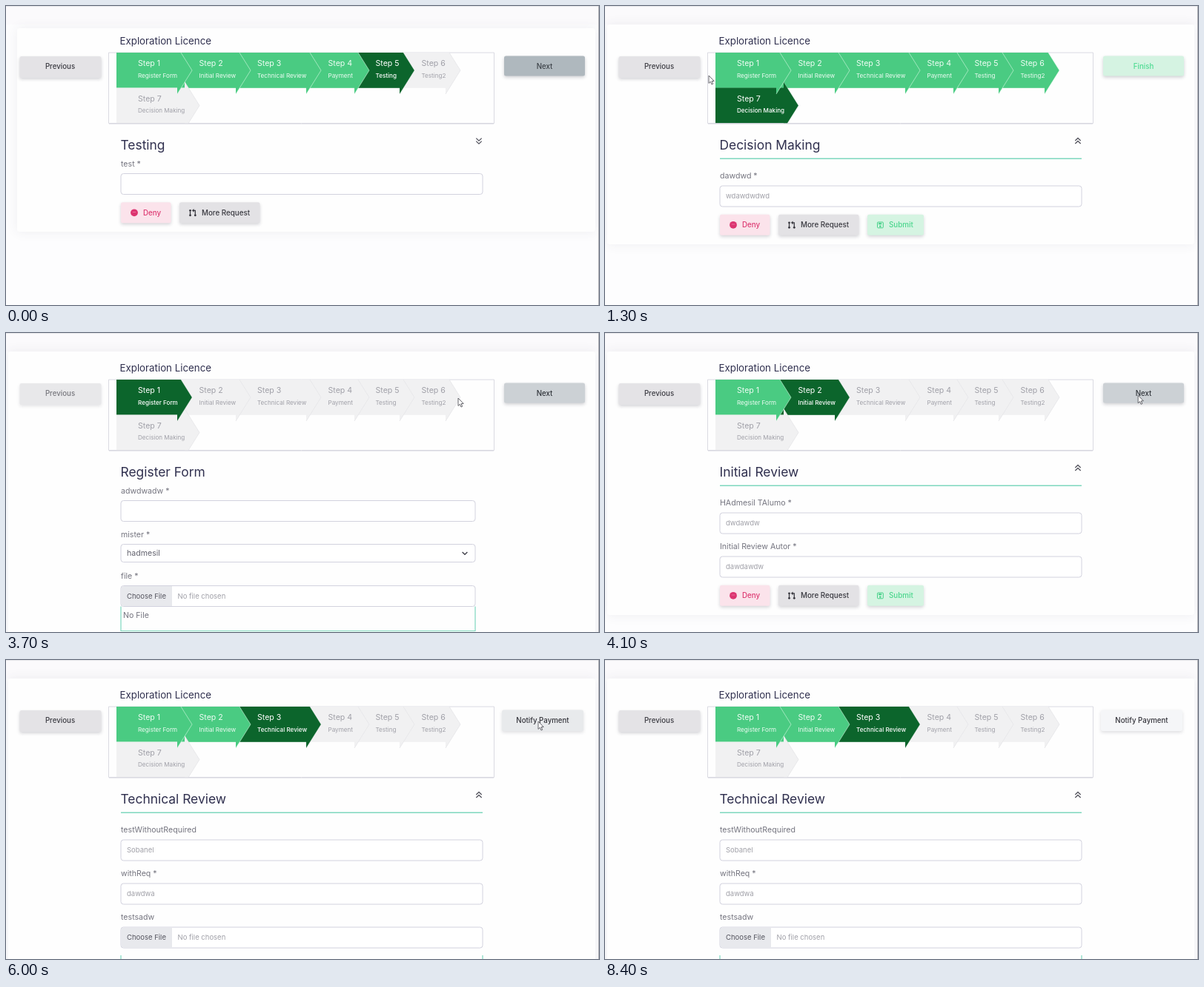
These frames come from a looping animation (800x404 px, 8.5 s). An HTML page with a canvas:

```html
<!DOCTYPE html>
<html lang="en">
<head>
<meta charset="utf-8">
<title>Licence workflow</title>
<style>
  html, body { margin: 0; width: 100%; height: 100%; overflow: hidden; background: #fdfdfe; }
  canvas { display: block; width: 800px; height: 404px; }
</style>
</head>
<body>
<canvas id="stage"></canvas>
<script>
const W = 800, H = 404, LOOP = 8500, TICK = 100;
const canvas = document.getElementById('stage');
const ctx = canvas.getContext('2d');
const ratio = window.devicePixelRatio || 1;
canvas.width = W * ratio;
canvas.height = H * ratio;

const INK = '#30304f', LABEL = '#74747f', MUTED = '#a0a0a8';
const DONE = '#4acb82', CURRENT = '#0c652c', IDLE = '#f1f1f2', TEAL = '#7ed8be';

// name, text x, arrow tip x
const STEPS = [
  ['Register Form', 178, 251],
  ['Initial Review', 260.5, 330],
  ['Technical Review', 339, 425],
  ['Payment', 434.5, 490],
  ['Testing', 498.5, 551],
  ['Testing2', 560.5, 613],
  ['Decision Making', 178, 261]
];

const FORMS = {
  testing: { bottom: 305, width: 488, toggle: 'down', fields: [['test *', '']], buttons: 2 },
  decision: { bottom: 322, width: 488, toggle: 'up', fields: [['dawdwd *', 'wdawdwdwd']], buttons: 3 },
  loading: { bottom: 249, width: 488, fields: [], buttons: 0 },
  register: {
    bottom: 430, width: 478, buttons: 0, previewGap: 0,
    fields: [['adwdwadw *', ''], ['mister *', 'hadmesil', 'select'], ['file *', '', 'file']]
  },
  initial: {
    bottom: 381, width: 488, toggle: 'up', buttons: 3,
    fields: [['HAdmesil TAlumo *', 'dwdawdw'], ['Initial Review Autor *', 'dawdawdw']]
  },
  technical: {
    bottom: 430, width: 488, toggle: 'up', buttons: 0, previewGap: 10,
    fields: [['testWithoutRequired', 'Sobanel'], ['withReq *', 'dawdwa'], ['testsadw', '', 'file']]
  }
};

// Each entry: start time, value
const STEP_TIMES = [[0, 5], [300, 6], [700, 7], [1700, 1], [4000, 2], [4300, 3]];
const FORM_TIMES = [[0, 'testing'], [300, 'decision'], [1700, 'loading'], [2500, 'register'],
  [4000, 'initial'], [4900, 'technical']];
const ACTIONS = {
  pressed: ['Next', 672, '#afb8be', '#3c4248'],
  next: ['Next', 672, '#ccd1d5', '#30343a'],
  finish: ['Finish', 672, '#d5f3e2', '#4ddb92'],
  notify: ['Notify Payment', 669, '#f5f6f8', '#33333a'],
  hover: ['Notify Payment', 669, '#e8eaec', '#33333a']
};
const ACTION_TIMES = [[0, 'pressed'], [300, 'next'], [700, 'finish'], [1700, 'next'],
  [4300, 'notify'], [4900, 'hover'], [6300, 'notify']];
const POINTER = [[200, 728, 84], [900, 150, 92], [1300, 140, 94], [1600, 192, 84], [2700, 193, 84],
  [3400, 514, 86], [3500, 514, 86], [3700, 610, 88], [3900, 722, 84], [4600, 712, 85],
  [5300, 718, 83], [6200, 718, 83], [6800, 600, 410]];

const at = (track, t) => track.filter(k => k[0] <= t).pop()[1];

function text(str, x, y, size, color, weight = 400, align = 'left') {
  ctx.font = `${weight} ${size}px Inter, "Open Sans", sans-serif`;
  ctx.fillStyle = color;
  ctx.textAlign = align;
  ctx.fillText(str, x, y);
}

function path(points, close) {
  ctx.beginPath();
  points.forEach(([x, y], i) => i ? ctx.lineTo(x, y) : ctx.moveTo(x, y));
  if (close) ctx.closePath();
}

function line(points, color, width = 1) {
  path(points);
  ctx.strokeStyle = color;
  ctx.lineWidth = width;
  ctx.stroke();
}

function box(x, y, w, h, r, fill, stroke) {
  ctx.beginPath();
  ctx.roundRect(x, y, w, h, r);
  if (fill) { ctx.fillStyle = fill; ctx.fill(); }
  if (stroke) { ctx.strokeStyle = stroke; ctx.lineWidth = 1; ctx.stroke(); }
}

function raised(x, y, w, h, fill, shade = 0.2) {
  ctx.save();
  ctx.shadowColor = `rgba(40,40,60,${shade})`;
  ctx.shadowBlur = 4 * ratio;
  ctx.shadowOffsetY = 2 * ratio;
  box(x, y, w, h, 2.5, fill);
  ctx.restore();
}

function drawPage(bottom, first) {
  ctx.fillStyle = '#fdfdfe';
  ctx.fillRect(0, 0, W, H);
  ctx.fillStyle = '#fbfafc';
  ctx.fillRect(0, 0, W, 25);
  ctx.save();
  ctx.shadowColor = 'rgba(60,60,90,0.08)';
  ctx.shadowBlur = 16 * ratio;
  const x = first ? 15 : 3, y = first ? 30 : 25;
  box(x, y, 795 - x, bottom - y, 3, '#fefefe');
  ctx.restore();
  ctx.fillStyle = '#e6e6e9';
  ctx.fillRect(0, 0, W, 1);
  ctx.fillStyle = '#aeaeb4';
  ctx.fillRect(799, 0, 1, H);
}

function drawSteps(active) {
  box(138.5, 63, 520, 95.5, 0, '#fefefe', '#dadae2');
  line([[139, 159.2], [658, 159.2]], '#cfcfd8', 0.7);
  const fill = i => i + 1 < active ? DONE : i + 1 === active ? CURRENT : IDLE;

  ctx.save();
  ctx.beginPath();
  ctx.rect(139, 63, 519, 95.3);
  ctx.clip();
  STEPS.forEach(([, , tip], i) => {
    const left = i % 6 ? STEPS[i - 1][2] - 20 : 149;
    ctx.fillStyle = fill(i);
    ctx.fillRect(left, i < 6 ? 63 : 110.5, tip - 20 - left + 0.3, 47.8);
  });
  for (let i = 6; i >= 0; i--) {
    const tip = STEPS[i][2], mid = i < 6 ? 87 : 134.5;
    const edge = [[tip - 20, mid - 32], [tip, mid], [tip - 20, mid + 32]];
    path(edge, true);
    ctx.fillStyle = fill(i);
    ctx.fill();
    line(edge, i + 1 < active ? 'rgba(235,255,242,0.65)' : i + 1 > active ? '#e5e5e7' : 'rgba(255,255,255,0.3)', 0.8);
  }
  ctx.restore();

  STEPS.forEach(([name, x], i) => {
    const y = i < 6 ? 81 : 128.7;
    const color = i + 1 < active ? '#effcf4' : i + 1 === active ? '#ffffff' : MUTED;
    text('Step ' + (i + 1), x, y, 10.6, color);
    text(name, x, y + 15.6, 8.1, color, i + 1 === active ? 500 : 400);
  });
}

function drawToggle(dir) {
  const s = dir === 'up' ? -1 : 1;
  for (const y of [-2, 2]) {
    line([[634.3, 182.3 + y - 1.7 * s], [638, 182.3 + y + 1.8 * s], [641.7, 182.3 + y - 1.7 * s]], '#55555f', 1.3);
  }
}

function drawField([label, value, kind], y, width) {
  const top = y + 13.5, h = kind === 'select' ? 24 : 28, mid = top + h / 2;
  text(label, 155, y + 3.7, 10.6, LABEL);
  box(155, top, width, h, 3.5, '#ffffff', '#d2d2de');
  if (kind === 'file') {
    box(155.5, top + 0.5, 68.5, h - 1, [3, 0, 0, 3], '#e8e9ed');
    text('Choose File', 163, mid + 3.3, 9.5, '#55555f');
    text('No file chosen', 231.5, mid + 3.3, 9.5, MUTED);
  } else if (kind === 'select') {
    text(value, 163, mid + 3.7, 10.6, '#62626e');
    const x = 155 + width - 14;
    line([[x - 3.4, mid - 1.6], [x, mid + 1.8], [x + 3.4, mid - 1.6]], '#44444e', 1.4);
  } else {
    text(value, 163, mid + 3.3, 9.5, MUTED);
  }
  return top + h;
}

function drawButtons(y, count) {
  const mid = y + 14, base = mid + 3.4;
  raised(155, y, 67.5, 28, '#fbe3eb');
  ctx.beginPath();
  ctx.arc(173, mid, 4.9, 0, 7);
  ctx.fillStyle = '#dc3470';
  ctx.fill();
  line([[170.8, mid - 0.8], [175.2, mid - 0.8]], '#ee7da5', 0.8);
  text('Deny', 185, base, 9.8, '#dd3a72', 500);

  raised(234, y, 108.5, 28, '#e3e2e5');
  line([[248.5, mid - 2], [248.5, mid + 4]], '#33333a', 1.2);
  line([[252, mid - 3], [255.3, mid - 3], [255.3, mid + 4]], '#33333a', 1.2);
  for (const [x, dy] of [[248.5, -3], [248.5, 3.5], [255.3, 3.5]]) {
    box(x - 1.4, mid + dy - 1.4, 2.8, 2.8, 1.4, '#33333a');
  }
  path([[253.5, mid - 5.4], [251, mid - 3], [253.5, mid - 0.6]], true);
  ctx.fill();
  text('More Request', 264, base, 9.8, '#38383f', 500);

  if (count < 3) return;
  raised(354, y, 76, 28, '#d5f4e2');
  box(367.5, mid - 3.8, 7.8, 7.8, 1, null, '#43d187');
  box(369, mid - 2.6, 4.2, 2, 0, '#43d187');
  box(370, mid + 0.8, 2.6, 2.2, 1, '#43d187');
  text('Submit', 383, base, 9.8, '#4bd68d', 500);
}

function drawForm(form, title) {
  text(title, 154.5, 194, 17.4, INK);
  if (form.toggle) drawToggle(form.toggle);
  let y = 213, end = 0;
  if (form.toggle === 'up') {
    line([[155, 206.3], [643, 206.3]], TEAL, 1.4);
    y = 229.5;
  }
  for (const field of form.fields) {
    end = drawField(field, y, form.width);
    y = end + (field[2] === 'select' ? 18.5 : 17.5);
  }
  if (form.buttons) drawButtons(end + 10.8, form.buttons);
  if (form.previewGap !== undefined) {
    const top = end + form.previewGap;
    line([[155, top], [155, top + 33], [155 + form.width, top + 33], [155 + form.width, top]], TEAL, 1.2);
    text('No File', 158, top + 15, 10.6, LABEL);
  }
}

function drawPointer(t) {
  const i = POINTER.findIndex(k => k[0] > t);
  if (i < 1) return;
  const [t0, x0, y0] = POINTER[i - 1], [t1, x1, y1] = POINTER[i];
  const p = (t - t0) / (t1 - t0);
  ctx.save();
  ctx.translate(x0 + (x1 - x0) * p, y0 + (y1 - y0) * p);
  path([[0, 0], [0, 10.4], [2.4, 8.2], [4, 12], [5.7, 11.2], [4.1, 7.6], [7.2, 7.4]], true);
  ctx.fillStyle = '#ffffff';
  ctx.fill();
  ctx.strokeStyle = '#55555c';
  ctx.lineWidth = 0.9;
  ctx.stroke();
  ctx.restore();
}

function draw(t) {
  const active = at(STEP_TIMES, t);
  const form = FORMS[at(FORM_TIMES, t)];
  const [label, x, fill, color] = ACTIONS[at(ACTION_TIMES, t)];
  const wide = label === 'Notify Payment';
  ctx.setTransform(ratio, 0, 0, ratio, 0, 0);

  drawPage(form.bottom, t < 300);
  text('Exploration Licence', 153.5, 52, 13.3, INK);
  drawSteps(active);

  const disabled = active === 1;
  raised(18.5, 68, 110, 29, disabled ? '#e8e8ea' : '#e4e3e6', disabled ? 0.12 : 0.2);
  text('Previous', 73, 84.8, 9.7, disabled ? '#77777d' : '#3b3b42', 500, 'center');
  raised(x, 67.5, wide ? 110 : 109, wide ? 28.5 : 27, fill, wide ? 0.15 : 0.22);
  text(label, wide ? 724 : 726.5, 84.8, 9.7, color, 500, 'center');

  drawForm(form, STEPS[active - 1][0]);
  drawPointer(t);
}

function frame(now) {
  draw(Math.floor((now % LOOP) / TICK) * TICK);
  requestAnimationFrame(frame);
}
requestAnimationFrame(frame);
</script>
</body>
</html>
```
